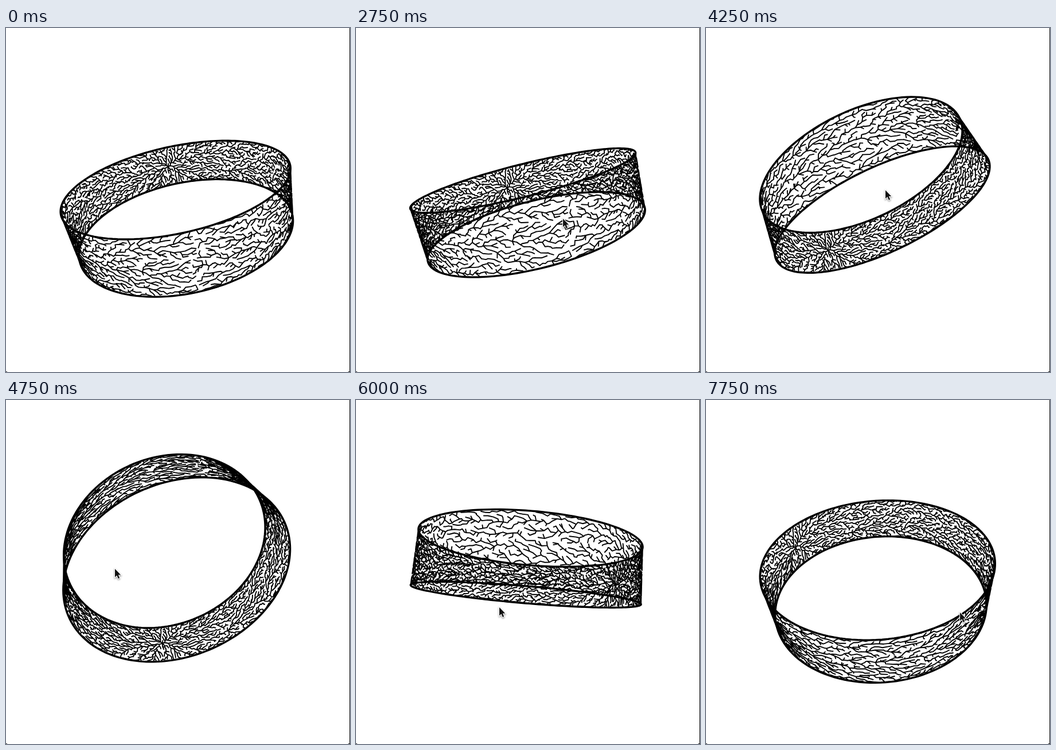
Animation of 600x599 px, one loop 8 s. Source, as an HTML page with a canvas:

```html
<!DOCTYPE html>
<html lang="en">
<head>
<meta charset="utf-8">
<title>Rotating band</title>
<style>
html, body { margin: 0; width: 100%; height: 100%; overflow: hidden; background: #fff; }
canvas { display: block; }
</style>
</head>
<body>
<canvas id="stage" width="600" height="599"></canvas>
<script>
const ctx = document.getElementById('stage').getContext('2d');
const LOOP = 8000, STEP = 250;
const CENTER = 299.5, FOCAL = 553, DIST = 2.95, HALF = 0.238;
const TAU = Math.PI * 2, RAD = Math.PI / 180;
const ARROW = new Path2D('M0 0V14.5L3.4 11.4L5.8 17L8.2 16L5.8 10.6L10.2 10.4Z');

const linear = k => k;
const easeOut = k => 1 - (1 - k) ** 2;

// Drag stops: angles in degrees and the pointer tip.
const STOPS = [
  { t: 2250, roll: 12.3, elev: 24.8, spin: -1.6, x: 331, y: 407 },
  { t: 2750, roll: 14, elev: 12.1, spin: -12, x: 361, y: 332 },
  { t: 3750, roll: 27.4, elev: 0, spin: -68, x: 436, y: 271 },
  { t: 4750, roll: 23.3, elev: -48.6, spin: -28, x: 190, y: 294 },
  { t: 6000, roll: -4.8, elev: -8.6, spin: 68, x: 250, y: 361 },
  { t: 7000, roll: 15, elev: 24.2, spin: -8, x: 443, y: 371 },
  { t: 7750, roll: 4.8, elev: 38.1, spin: -58, x: 443, y: 370, ease: easeOut }
];

const mix = (a, b, k) => a + (b - a) * k;
const clamp = k => Math.min(1, Math.max(0, k));

function stateAt(t) {
  const i = Math.max(1, STOPS.findIndex(s => t <= s.t));
  const a = STOPS[i - 1], b = STOPS[i];
  const k = (b.ease || linear)(clamp((t - a.t) / (b.t - a.t)));
  const state = {};
  for (const key of ['roll', 'elev', 'spin', 'x', 'y']) state[key] = mix(a[key], b[key], k);
  if (t < 1750) {
    // the pointer enters from the lower left corner and rests
    const e = clamp((t - 250) / 1000);
    state.x = mix(2, 326, e);
    state.y = mix(585, 381, e);
  }
  return state;
}

function seeded(seed) {
  return () => (seed = (seed * 16807) % 2147483647) / 2147483647;
}

// Cheapest-path tree over scattered points on the unrolled band.
// Squared lengths favour short hops, which gives wavy strands with twigs.
function growTree(rows, cols, reach) {
  const rnd = seeded(4127);
  const jitter = () => 0.5 + (rnd() - 0.5) * 0.95;
  const open = [{ a: 0, h: 0, cost: 0 }], edges = [];
  for (let i = 0; i < rows * cols; i++) {
    open.push({
      a: (Math.floor(i / rows) + jitter()) / cols * TAU,
      h: ((i % rows + jitter()) / rows * 2 - 1) * HALF,
      cost: Infinity
    });
  }
  while (open.length) {
    let best = 0;
    for (let i = 1; i < open.length; i++) if (open[i].cost < open[best].cost) best = i;
    const p = open[best], last = open.pop();
    if (p !== last) open[best] = last;
    if (p.parent) edges.push([p, p.parent]);
    for (const q of open) {
      const dh = Math.abs(q.h - p.h);
      if (dh > reach) continue;
      let da = Math.abs(q.a - p.a);
      if (da > Math.PI) da = TAU - da;
      if (da > reach) continue;
      const cost = p.cost + da * da + dh * dh;
      if (cost < q.cost) {
        q.cost = cost;
        q.parent = p;
      }
    }
  }
  return edges;
}

function projector({ roll, elev, spin }) {
  const cr = Math.cos(roll * RAD), sr = Math.sin(roll * RAD);
  const c = Math.cos(elev * RAD), s = Math.sin(elev * RAD);
  return (a, h) => {
    const u = Math.sin(a + spin * RAD), v = Math.cos(a + spin * RAD);
    const up = c * h + s * v;
    const k = FOCAL / (DIST - s * h + c * v);
    return [CENTER + k * (u * cr - up * sr), CENTER - k * (u * sr + up * cr)];
  };
}

const tree = growTree(17, 220, 0.06);

function drawBand(state) {
  const at = projector(state);
  ctx.strokeStyle = '#000';
  ctx.lineCap = ctx.lineJoin = 'round';

  ctx.lineWidth = 1.9;
  ctx.beginPath();
  for (const [p, q] of tree) {
    ctx.moveTo(...at(p.a, p.h));
    ctx.lineTo(...at(q.a, q.h));
  }
  ctx.stroke();

  ctx.lineWidth = 3.4;
  for (const h of [-HALF, HALF]) {
    ctx.beginPath();
    for (let i = 0; i < 160; i++) ctx.lineTo(...at(i / 160 * TAU, h));
    ctx.closePath();
    ctx.stroke();
  }
}

function drawPointer({ x, y }) {
  ctx.save();
  ctx.translate(x, y);
  ctx.lineJoin = 'miter';
  ctx.lineWidth = 2;
  ctx.strokeStyle = '#fff';
  ctx.shadowColor = 'rgba(0,0,0,.45)';
  ctx.shadowBlur = 3;
  ctx.shadowOffsetY = 1.5;
  ctx.stroke(ARROW);
  ctx.shadowColor = 'transparent';
  ctx.fillStyle = '#111';
  ctx.fill(ARROW);
  ctx.restore();
}

function drawFrame(t) {
  const state = stateAt(t);
  ctx.fillStyle = '#fff';
  ctx.fillRect(0, 0, 600, 599);
  drawBand(state);
  if (t >= 250) drawPointer(state);
  // window edge
  ctx.fillStyle = '#222';
  ctx.fillRect(599, 0, 1, 599);
  ctx.fillRect(0, 598, 2, 1);
  ctx.fillRect(597, 598, 2, 1);
}

let shown = -1;
function tick() {
  const t = Math.floor(performance.now() % LOOP / STEP) * STEP;
  if (t !== shown) drawFrame(shown = t);
  requestAnimationFrame(tick);
}
tick();
</script>
</body>
</html>
```
